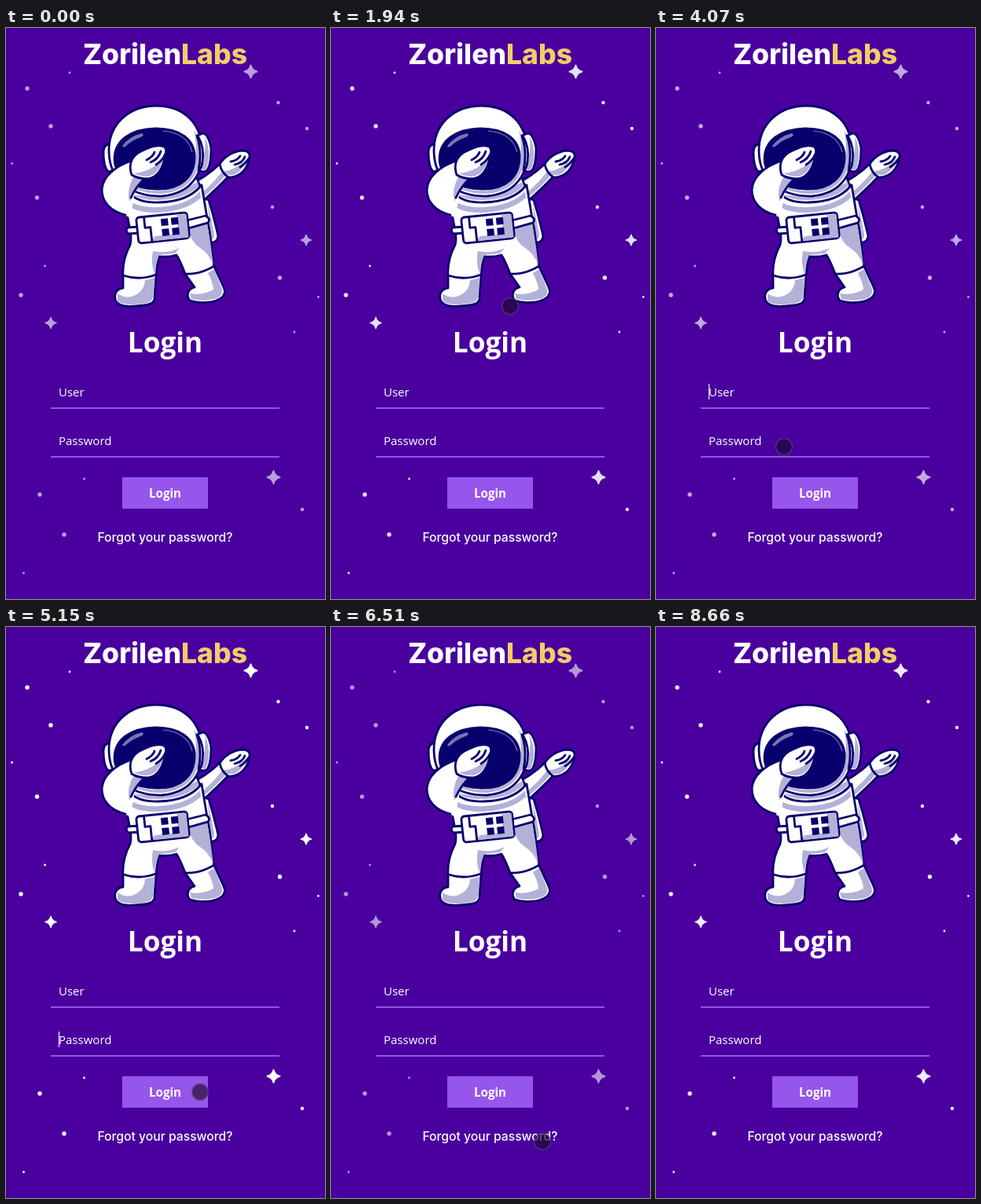
An HTML page for the animation above (8.69 s loop, 406x727 px).

```html
<!DOCTYPE html>
<html lang="en">
<head>
<meta charset="utf-8">
<title>Login</title>
<style>
  html, body { margin: 0; width: 100%; height: 100%; overflow: hidden; background: #4a009f; }
  svg { display: block; width: 406px; height: 727px; }
  text { fill: #fff; font-family: "Open Sans", sans-serif; }
  .brand, .link { font-family: Inter, sans-serif; }
  .brand { font-size: 35.5px; font-weight: 800; }
  .brand tspan { fill: #f1cd68; }
  .link { font-size: 15.7px; font-weight: 500; }
  .mid { text-anchor: middle; }
  .field { font-size: 15px; font-weight: 500; }
  .bold { font-weight: 700; }
  .rule { fill: #9255e8; }
  .ink { stroke: #0a006e; stroke-width: 2.8; stroke-linejoin: round; stroke-linecap: round; }
  .suit { fill: #fff; }
  .shade { fill: #b4b1d8; }
  .line { fill: none; }
  .navy { fill: #08006c; }
  #sky { fill: #fff; stroke: #fff; stroke-linecap: round; stroke-linejoin: round; }
</style>
</head>
<body>
<svg viewBox="0 0 406 727">
  <defs>
    <path id="sparkle" stroke-width="2" d="M0-8Q1.5-1.5 8 0Q1.5 1.5 0 8Q-1.5 1.5-8 0Q-1.5-1.5 0-8Z"/>
  </defs>
  <rect width="406" height="727" fill="#4a009f"/>
  <g id="sky">
    <path stroke-width="2.8" d="M81 57h0M7.5 172.5h0M49.5 303h0M397.5 342.5h0M367 387h0M99.5 574h0M22.5 694h0"/>
    <path stroke-width="4.4" d="M346.5 95h0M383 128h0M339 228h0M377 613h0"/>
    <path stroke-width="5.4" d="M27 77h0M57 125h0M39.5 216h0M348.5 318h0M19 340h0M43 594h0M74 645h0"/>
    <use href="#sparkle" x="311.5" y="55.5"/>
    <use href="#sparkle" transform="translate(382 270) scale(.82)"/>
    <use href="#sparkle" transform="translate(57 375.5) scale(.86)"/>
    <use href="#sparkle" x="340.5" y="572"/>
  </g>

  <text class="brand mid" x="202.5" y="46">Zorilen<tspan>Labs</tspan></text>

  <g id="astronaut">
    <!-- backpack and far arm -->
    <path class="ink suit" d="M248 216L258 219C263 235 267 251 270 265Q269 274 260 273L251 268Z"/>
    <path class="shade" d="M257 222L265 263Q265 269 260 270Z"/>
    <path class="ink suit" d="M240 196C252 190 263 182 272 173C278 164 290 156 302 156Q311 157 310 164C309 174 303 184 294 188Q288 191 282 190C271 202 261 211 251 220L240 225Z"/>
    <path class="shade" d="M306 167C303 177 297 184 290 187L280 187Q267 203 250 216L246 212Q262 200 275 183Q293 181 306 167Z"/>
    <path class="ink line" d="M272 173Q274 184 283 190M286 170Q294 169 298 163M291 174Q301 172 304 164M298 177Q305 173 309 166"/>

    <!-- body and legs -->
    <path class="ink suit" d="M152 205V226L158 258Q160 269 158 276C150 291 148 304 149 317V331C139 332 137 341 140 348C145 356 160 355 176 353C186 352 190 348 189 342L191 316C192 304 193 296 195 291Q207 292 217 289C222 297 225 305 228 313L240 330C231 332 229 342 234 347C245 351 262 350 270 346C278 342 280 336 277 330L265 304C261 287 262 270 257 248L249 200Z"/>
    <path class="shade" d="M231 251L256 248L260 272L264 302Q258 287 247 280Q234 272 231 251Z"/>
    <path class="shade" d="M187 284Q205 288 221 280L215 287L195 289Q190 302 189 314Q184 298 187 284Z"/>
    <path class="shade" d="M177 321L189 318L187 342Q187 349 175 351Q146 354 142 347V338Q155 347 168 338Q176 333 177 321Z"/>
    <path class="shade" d="M257 312L265 307L274 330Q278 339 269 344Q252 349 236 345L234 338Q250 341 264 333Q264 326 257 312Z"/>
    <path class="shade" d="M160 222Q172 229 195 228Q230 226 247 208L248 216Q230 233 195 235Q172 236 160 229Z"/>
    <path class="ink line" d="M149 315Q170 322 191 314M227 313Q247 314 265 303"/>

    <!-- belt -->
    <path class="ink suit" d="M155 254L170 253V261L156 262Q151 258 155 254ZM230 245L254 239Q261 243 257 248L232 255Z"/>
    <g transform="rotate(-6 199 254)">
      <rect class="ink suit" x="167" y="238" width="65" height="33" rx="4"/>
      <path class="shade" d="M219 240H231V270H181L189 264H214Q218 263 218 258Z"/>
      <path class="ink line" d="M177 239V252H184V270"/>
      <path class="navy" d="M198 243h9v9h-9zM211 243h9v9h-9zM198 256h9v9h-9zM211 256h9v9h-9z"/>
    </g>

    <!-- helmet -->
    <path class="ink suit" d="M156 203L158 211Q169 223 195 222Q231 221 247 202L243 191Z"/>
    <path class="shade" d="M162 212Q200 219 244 196L245 201Q229 218 195 219Q172 220 162 212Z"/>
    <path class="ink suit" d="M132 148Q124 148 124 158Q124 177 130 183L137 181Z"/>
    <path class="ink suit" d="M131 158C130 121 158 99 191 99C226 99 250 121 250 160C249 190 232 211 199 214C160 215 132 195 131 158Z"/>
    <path class="shade" d="M239 130Q248 143 247 160C246 189 230 208 199 211Q165 212 144 190Q165 209 199 207C232 201 249 169 239 130Z"/>
    <path class="ink navy" d="M138 167C138 142 160 129 190 128C222 128 240 142 240 164C240 190 222 205 195 205C165 206 139 193 138 167Z"/>
    <path fill="#7774b7" d="M148 150Q157 138 173 134Q178 137 169 140Q159 144 153 150Q149 153 148 150Z"/>
    <path class="line" stroke="#7774b7" stroke-width="1.2" d="M200 131Q231 134 237 158"/>
    <path class="ink suit" d="M243 137L251 134Q258 136 261 153Q261 174 256 181Q252 185 245 181Q250 158 243 137Z"/>
    <path class="shade" d="M253 138Q259 151 258 165Q257 177 253 181L247 179Q255 163 253 138Z"/>
    <path class="ink line" d="M244 137Q253 153 250 170Q249 179 245 182"/>

    <!-- near arm -->
    <path class="suit" d="M152 239C134 234 122 222 122 206C123 189 139 176 160 169L164 190Q174 191 172 197Q163 206 162 221L158 241Z"/>
    <path class="shade" d="M163 188L176 193Q165 204 161 214L157 221Q153 205 163 188Z"/>
    <path class="ink line" d="M152 238C134 234 122 222 122 206C123 189 139 176 160 169M176 192Q166 201 159 216"/>
    <path class="ink suit" d="M159 171Q162 161 174 156Q191 147 201 151Q206 155 202 164C200 178 193 190 181 192Q168 192 160 187Q157 179 159 171Z"/>
    <path class="shade" d="M200 166C197 179 190 188 180 189Q169 189 163 185Q185 183 200 166Z"/>
    <path class="ink line" d="M179 168Q187 164 189 158M184 171Q194 167 197 157M191 174Q199 169 203 160"/>
  </g>

  <text class="mid bold" x="202.5" y="413" font-size="35.2">Login</text>
  <text class="field" x="67" y="469">User</text>
  <rect class="rule" x="57" y="483" width="291" height="2"/>
  <text class="field" x="67" y="531">Password</text>
  <rect class="rule" x="57" y="545" width="291" height="2"/>
  <rect x="148" y="572" width="109" height="40" fill="#9656eb"/>
  <text class="mid bold" x="202.5" y="598" font-size="15.2">Login</text>
  <text class="link mid" x="202.5" y="654">Forgot your password?</text>

  <rect id="caret" x="67" width="1" height="20" fill="#fff"/>
  <circle id="pointer" r="10.5" fill="#1c0a2c" fill-opacity=".66"
    stroke="#665080" stroke-opacity=".5" stroke-width="1.6"/>
</svg>
<script>
const LOOP = 8690, BLINK = 500, FADE = 2000, PEAK = 1230;
const SHOWN = 540, USER = 2900, PASSWORD = 4080, LOGIN = 5600, HIDDEN = 7320;
const [sky, caret, pointer] = ['sky', 'caret', 'pointer'].map(id => document.getElementById(id));

// Stops of the pointer: title, foot, user field, password field, button, link.
const stops = [
  { t: 1040, x: 252, y: 32 },
  { t: 1940, x: 228, y: 354 },
  { t: 3050, x: 132, y: 465 },
  { t: PASSWORD, x: 163, y: 533 },
  { t: 5150, x: 247, y: 592 },
  { t: 6510, x: 269, y: 655 }
];

const mix = (a, b, k) => a + (b - a) * k;
const smooth = k => k * k * (3 - 2 * k);

// Stars swing between bright and dark, slowing down near the bright end.
function glow(t) {
  const fromPeak = Math.abs((t - PEAK + 3 * FADE) % (2 * FADE) - FADE);
  return 1 - (fromPeak / FADE) ** 2;
}

function pointerAt(t) {
  const next = stops.findIndex(s => s.t > t);
  if (next < 1) return next ? stops.at(-1) : stops[0];
  const a = stops[next - 1], b = stops[next];
  const k = smooth((t - a.t) / (b.t - a.t));
  return { x: mix(a.x, b.x, k), y: mix(a.y, b.y, k) };
}

function drawCaret(t) {
  const since = t - (t < PASSWORD ? USER : PASSWORD);
  const on = since >= 0 && t < LOGIN && since % (2 * BLINK) < BLINK;
  caret.setAttribute('y', t < PASSWORD ? 453 : 515);
  caret.setAttribute('opacity', +on);
}

const start = performance.now();
function draw() {
  const t = (performance.now() - start) % LOOP;
  const { x, y } = pointerAt(t);
  sky.setAttribute('opacity', glow(t));
  pointer.setAttribute('transform', `translate(${x} ${y})`);
  pointer.setAttribute('opacity', +(t >= SHOWN && t < HIDDEN));
  drawCaret(t);
  requestAnimationFrame(draw);
}
draw();
</script>
</body>
</html>
```
